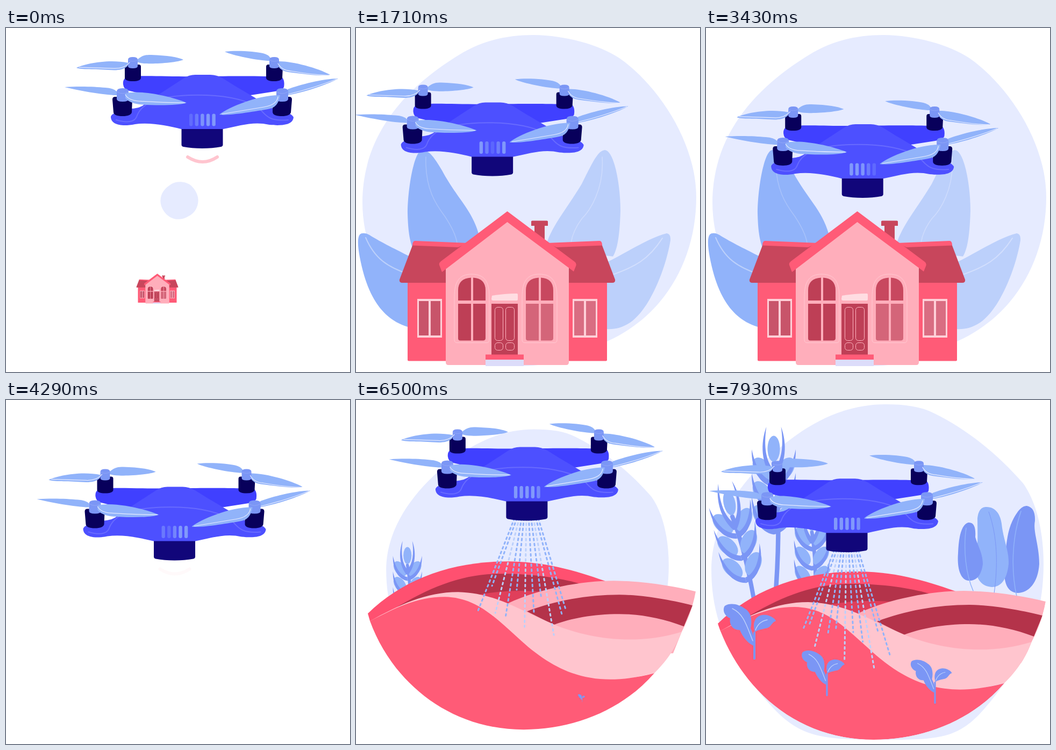
These frames come from a looping animation (640x640 px, 8000 ms). An HTML page:

```html
<!DOCTYPE html>
<html lang="en">
<head>
<meta charset="utf-8">
<title>Drone</title>
<style>
  html, body { margin: 0; width: 100%; height: 100%; overflow: hidden; background: #fff; }
  svg { display: block; width: 100%; height: 100%; }
  .sky { fill: #e6ebff; }
  .blue { fill: #91b3fa; }
  .pale { fill: #bcd0fb; }
  .mid { fill: #7b96f5; }
  .navy { fill: #08005b; }
  .red { fill: #ff5b77; }
  .pink { fill: #ffaebb; }
  .blush { fill: #ffc5ce; }
  .roof { fill: #c8465c; }
  .wine { fill: #be3f56; }
  .dark { fill: #b4334a; }
  .line { fill: none; stroke-linecap: round; stroke-linejoin: round; }
  .sky, .leaf, #house, #trees { transform-box: fill-box; transform-origin: center; }
  .leaf, #trees { transform-origin: bottom; }
</style>
</head>
<body>
<svg viewBox="0 0 640 640">
  <defs>
    <clipPath id="bowl"><path d="M0 0H640V375H632C626 408 616 430 606 450C592 486 575 507 555 527C495 596 405 632 312 632C170 632 66 540 22 417H0Z"/></clipPath>

    <g id="wheat">
      <path class="line" d="M0 0C10 60 10 150 2 250" stroke="#7b96f5" stroke-width="8"/>
      <ellipse class="blue" cy="-26" rx="11" ry="23"/>
      <g id="grains">
        <g id="grain">
          <ellipse class="blue" cx="-20" cy="10" rx="14" ry="23" transform="rotate(-35 -20 10)"/>
          <path class="mid" d="M0 42C-24 38 -40 12 -39 -25C-32 8 -20 27 0 32Z"/>
        </g>
        <use href="#grain" transform="scale(-1 1)"/>
      </g>
      <use href="#grains" y="42"/>
      <use href="#grains" y="84"/>
      <path class="mid" d="M-3 25C-22 0 -24 -35 -13 -65C-18 -30 -14 -4 0 12C14 -4 18 -30 13 -65C24 -35 22 0 3 25Z"/>
    </g>

    <g id="sprout">
      <path class="line" d="M0 -50V-2" stroke="#7b96f5" stroke-width="4"/>
      <path class="mid" d="M-2 -26C-14 -32 -22 -43 -27 -55C-42 -55 -47 -67 -45 -77C-56 -81 -60 -93 -55 -100C-45 -107 -28 -103 -18 -95C-5 -88 -4 -71 -7 -58C-1 -46 0 -37 -2 -26ZM1 -51C-4 -68 1 -81 15 -83C25 -85 38 -78 40 -72C31 -69 32 -59 20 -58C12 -56 5 -55 1 -51Z"/>
      <path class="line" d="M-41 -95C-20 -85 -15 -65 -3 -35M2 -55C6 -66 13 -72 24 -74" stroke="#bcd0fb" stroke-width="1.5"/>
    </g>
  </defs>

  <path id="sky1" class="sky" d="M330 13C390 14 450 30 490 56C560 105 633 210 633 315C633 430 575 535 467 583C410 620 350 629 300 629C140 629 12 470 12 325C12 200 90 110 200 45C240 22 285 13 330 13Z"/>

  <g class="leaf"><path class="blue" d="M124 227C108 226 96 300 96 345C97 380 100 400 110 420H235C228 345 195 330 160 265C148 245 138 228 124 227Z"/>
    <path class="line" d="M130 240C128 300 150 330 165 350Q185 380 188 400" stroke="#a9c3fb" stroke-width="1.5"/></g>
  <g class="leaf"><path class="blue" d="M12 382C-2 382 4 420 15 460C30 510 55 545 100 557V425C70 410 40 395 25 385Q18 381 12 382Z"/>
    <path class="line" d="M18 390C35 430 60 445 98 458" stroke="#bcd0fb" stroke-width="2"/></g>
  <g class="leaf"><path class="pale" d="M578 382Q586 383 585 395C578 440 550 520 510 548C495 558 480 561 466 560V436C500 420 545 390 578 382Z"/>
    <path class="line" d="M570 391C545 430 520 445 468 462" stroke="#d3dffd" stroke-width="2"/></g>
  <g class="leaf"><path class="pale" d="M463 227C480 228 492 290 492 340C491 375 488 410 478 425L352 410C362 370 390 340 420 290C440 250 450 228 463 227Z"/>
    <path class="line" d="M458 240C462 300 435 340 420 355Q403 378 400 400" stroke="#cfdcfd" stroke-width="1.5"/></g>

  <g id="house">
    <path class="red" d="M96 465H467V617.500Q467 619.500 465 619.500H98Q96 619.500 96 617.500Z"/>
    <path class="roof" d="M106 402L81 468Q80 474 86 474H200V404ZM457 402L482 468Q483 474 477 474H363V404ZM326 360Q326 358.500 328 358.500H355Q357 358.500 357 360V368H351V394H332V368H326Z"/>
    <path class="red" d="M110 396L208 400L190 408L105 404.500Q105 396 110 396ZM453 396L355 400L373 408L458 404.500Q458 396 453 396Z"/>
    <path class="pink" d="M167 438L281.500 352L396 438V622Q396 627 391 627H172Q167 627 167 622Z"/>
    <path class="red" d="M281.500 341L407 435Q411 438 409 443L405 453L281.500 361L160 454L155 441Q154 437 158 434Z"/>
    <g id="windows"></g>
    <path d="M253 498Q276 494 299 494Q301 494 301 496V505Q301 507 299 507H255Q252 507 252 504Z" fill="#ffdde2"/>
    <path class="wine" d="M252 513h49v96h-49z"/>
    <g class="line" stroke="#ffb3bf"><rect x="258.500" y="519.500" width="15" height="62" rx="5"/><rect x="278.500" y="519.500" width="16" height="62" rx="5"/><rect x="258.500" y="585.500" width="15" height="14" rx="5"/><rect x="278.500" y="585.500" width="16" height="14" rx="5"/></g>
    <path class="red" d="M241 607.500h71v10h-71z"/>
    <path d="M241 617h71v12h-71z" fill="#dcdcfa"/>
  </g>

  <path id="sky2" class="sky" d="M334 8C370 8 400 12 425 25C500 62 555 115 590 155C615 190 628 245 628 305C628 380 610 450 560 520C480 632 460 632 320 632C180 632 160 620 80 520C30 450 10 390 10 315C10 210 90 120 170 64C215 32 270 8 334 8Z"/>
  <g clip-path="url(#bowl)">
    <g transform="translate(126 118)"><g class="wheat"><use href="#wheat" transform="scale(1.05)"/></g></g>
    <g transform="translate(49 217)"><g class="wheat"><use href="#wheat" transform="rotate(-12)"/></g></g>
    <g transform="translate(197 246)"><g class="wheat"><use href="#wheat" transform="scale(.85)"/></g></g>
    <g id="trees">
      <path class="mid" d="M597 197Q613 200 612 225C608 245 620 270 620 305C618 340 600 359 580 359C560 358 553 340 555 305C558 275 560 245 570 225C580 205 588 197 597 197Z"/>
      <path class="blue" d="M520 199C540 198 548 215 550 230C553 260 564 280 563 305C560 335 548 348 532 348C510 347 500 330 501 300C507 270 505 245 505 220Q507 200 520 199Z"/>
      <path class="mid" d="M488 228C500 227 502 240 501 255C505 270 515 285 515 305C512 330 500 337 488 336C472 334 467 310 469 285C470 255 475 232 488 228Z"/>
      <path class="line" d="M484 238C478 280 484 325 497 355M586 207C568 260 568 320 578 365" stroke="#91b3fa" stroke-width="1.500"/>
      <path class="line" d="M526 208C543 255 543 310 536 360" stroke="#7b96f5"/>
    </g>
    <g id="field">
      <path d="M22 416C90 350 180 319 285 319C360 320 420 340 470 358L300 440L26 430Z" fill="#ff5070"/>
      <path class="dark" d="M70 408C140 365 200 342 270 342C330 342 380 350 415 360L320 410L200 385Z"/>
      <path d="M222 382C270 373 310 372 350 376L300 405Z" fill="#e03f5b"/>
      <path class="pink" d="M283 397C340 370 420 355 480 355C540 356 590 365 632 375C626 408 616 430 606 450L590 490H420L310 425Z"/>
      <path class="dark" d="M318 412C370 392 430 381 490 381C540 382 590 392 626 401L610 440C570 425 530 417 490 417C440 417 400 425 368 437Z"/>
      <path class="blush" d="M26 430C80 400 130 376 190 376C260 378 300 408 370 437C430 462 520 477 606 450C592 486 575 507 555 527L400 560L60 440Z"/>
      <path class="red" d="M26 430C70 408 110 385 165 385C225 386 260 425 300 460C380 535 450 554 555 527C495 596 405 632 312 632C170 632 66 540 26 430Z"/>
    </g>
  </g>
  <g transform="translate(426 565) scale(.79)"><use class="sprout" href="#sprout"/></g>
  <g transform="translate(90 483)"><use class="sprout" href="#sprout"/></g>
  <g transform="translate(225 551) scale(.82)"><use class="sprout" href="#sprout"/></g>

  <g id="drone">
    <g id="spray" class="line" stroke-width="3" stroke-dasharray="3.500 6"></g>
    <g id="signal" class="line" stroke="#ff5975" stroke-width="6">
      <path d="M338 240Q366 258 393 240"/>
      <path d="M326 254Q366 280 404 254"/>
      <path d="M317 271Q366 302 414 271"/>
    </g>
    <path d="M222 93C240 86 290 91 366 90C440 89 495 89 514 92Q519 98 517 110Q514 116 500 118L455 125L290 130C260 125 240 119 226 116Q219 113 218 105Q217 97 222 93Z" fill="#4040ff"/>
    <path d="M326.500 184H403.500V217Q403.500 220 400 221C380 225 350 225 330 221Q326.500 220 326.500 217Z" fill="#11067a"/>
    <path d="M330 94Q340 87 352 87H380Q392 87 404 94C435 114 465 130 500 152Q530 156 535 166C534 178 520 183 490 180C460 173 435 182 404 188H326C300 182 270 175 240 179C215 184 195 180 195 165Q197 156 234 150C255 148 258 141 270 133Z" fill="#4d50ff"/>
    <path class="line" d="M205 171C225 177 239 175 243 165C250 145 270 128 340 125C400 123 440 132 465 145C482 155 480 175 525 171" stroke="#686bff" stroke-width="2"/>
    <g id="vents"></g>
    <path class="navy" d="M221 72Q221 68 225 68H247Q251 68 251 72V93Q250 99 236 99Q222 99 221 93ZM484 72Q484 68 488 68H511Q515 68 515 72L514 93Q512 99 499 99Q485 99 484 93ZM198 133Q198 128 203 128H230Q235 128 235 133L234 157Q232 164 217 164Q201 164 200 157ZM496 133Q496 128 501 128H527Q532 128 532 133L530 157Q528 164 513 164Q497 164 496 157Z"/>
    <path class="blue" d="M131 74C145 67 190 57 228 65L226 71C217 79 205 79 190 78C165 76 140 78 131 74Z
      M244 59C255 50 260 50 270 50C300 51 320 54 330 59C320 64 280 67 262 66Q250 66 244 63Z
      M109 110C135 108 165 109 185 111Q200 112 206 118V125C180 125 130 115 109 110Z
      M493 61C475 62 420 51 407 44C430 41 465 44 478 47Q488 49 493 57Z
      M506 62C530 61 580 74 603 87C590 91 550 85 525 82Q511 80 506 70Z
      M524 114C545 106 590 94 618 94C605 102 560 119 524 125Z"/>
    <path class="mid" d="M227 59Q227 54 236 54Q245 54 245 59V71Q245 75 236 75Q227 75 227 71ZM490 59Q490 54 499 54Q508 54 508 59V71Q508 75 499 75Q490 75 490 71ZM206 118Q206 112 217 112Q228 112 228 118V132Q228 137 217 137Q206 137 206 132ZM503 118Q503 112 514 112Q525 112 525 118V132Q525 137 514 137Q503 137 503 132Z"/>
    <path class="blue" d="M222 122C245 114 305 126 336 139C320 145 270 144 248 142Q228 139 222 130Z
      M397 161C415 147 470 124 510 125C507 142 500 149 487 151C465 155 410 164 397 161Z"/>
    <path class="line" d="M136 73L200 75Q220 76 230 64M222 124Q228 135 248 136Q290 139 333 139M506 66Q513 79 530 80Q570 87 600 88M402 160L480 147Q504 143 506 128M526 123Q575 111 615 95" stroke="#e6ebff" stroke-width="1.200"/>
    <path class="line" d="M228 60Q236 64 244 60M491 60Q499 64 507 60M207 119Q217 125 227 119M504 119Q514 125 524 119" stroke="#91a7f8"/>
  </g>
</svg>
<script>
const LOOP = 8000;
const byId = id => document.getElementById(id);
const all = selector => [...document.querySelectorAll(selector)];
const clamp = v => Math.min(1, Math.max(0, v));
const ramp = (t, from, to) => clamp((t - from) / (to - from));
const easeOut = (u, power = 3) => 1 - (1 - u) ** power;
const backOut = (u, pull = 1.25) => 1 + (pull + 1) * (u - 1) ** 3 + pull * (u - 1) ** 2;

// Smooth monotone curve through a few [time, value] points, flat at both ends.
function track(...keys) {
  const slope = i => (keys[i + 1][1] - keys[i][1]) / (keys[i + 1][0] - keys[i][0]);
  const tangent = keys.map((_, i) => {
    if (!i || i === keys.length - 1) return 0;
    const a = slope(i - 1), b = slope(i);
    return a * b <= 0 ? 0 : 2 * a * b / (a + b);
  });
  return t => {
    const next = keys.findIndex(k => k[0] > t);
    if (next < 0) return keys[keys.length - 1][1];
    const i = next - 1, [t0, v0] = keys[i], [t1, v1] = keys[next];
    const d = t1 - t0, u = (t - t0) / d, w = 1 - u;
    return v0 * (1 + 2 * u) * w * w + tangent[i] * d * u * w * w
      + v1 * u * u * (3 - 2 * u) - tangent[next] * d * u * u * w;
  };
}

const droneX = track([0, 0], [960, -121], [2430, -95], [4290, -51.5], [5570, -1], [5850, 9], [7150, -103]);
const droneY = track([-900, -26], [0, 0], [2430, 71], [3400, 92], [4290, 74.500], [5570, 4], [6300, -1], [9000, 91]);

function archWindow(x, top, bottom) {
  return `<path class="line" stroke="#ffc9d2" d="M${x - 7} 500c0 -28 9 -42 32 -42c24 0 33 14 33 42v80q0 5.500 -5 5.500h-55q-5 0 -5 -5.500z"/>
    <path fill="${top}" d="M${x} 507v-19q0 -22 24 -23.500v42.500zM${x + 28} 507v-42.500q23 1.500 23 23.500v19z"/>
    <path fill="${bottom}" d="M${x} 513h24v68.500h-20q-4 0 -4 -4zM${x + 28} 513h23v64q0 4 -4 4.500h-19z"/>`;
}
const sideWindow = (x, glass) => `<path fill="#ffd0d8" d="M${x} 504h46v72h-46z"/>
  <path fill="${glass}" d="M${x + 3} 508h18v64h-18zM${x + 25} 508h18v64h-18z"/>`;
const repeat = (count, make) => Array.from({ length: count }, (_, i) => make(i)).join('');

byId('windows').innerHTML = archWindow(190, '#be3f56', '#be3f56') + archWindow(316, '#c8485f', '#d46579')
  + sideWindow(114, '#c8546a') + sideWindow(403, '#d96d82');
byId('vents').innerHTML = repeat(5, i =>
  `<rect x="${341 + i * 10.6}" y="159.500" width="6.400" height="23" rx="3" fill="#8199fb"/>`);
byId('spray').innerHTML = repeat(11, i => `<path stroke="${i % 3 === 2 ? '#bcd0fb' : '#91b3fa'}"/>`);

const leaves = all('.leaf'), wheats = all('.wheat'), sprouts = all('.sprout');
const signal = all('#signal path'), vents = all('#vents rect'), jets = all('#spray path');
const place = (el, value) => el.setAttribute('transform', value);
const scale = (el, size) => { el.style.transform = `scale(${size})`; };

function drawHome(t) {
  const leaving = 1 - ramp(t, 3450, 4220) ** 2;
  scale(byId('sky1'), easeOut(ramp(t, -54, 1120), 2.5) * leaving);
  scale(byId('house'), backOut(ramp(t, -45, 900)) * leaving);
  leaves.forEach((leaf, i) => scale(leaf, easeOut(ramp(t, 220 + 40 * i, 1000 + 40 * i)) * leaving));
}

function drawFarm(t) {
  scale(byId('sky2'), easeOut(ramp(t, 5830, 7090), 2.5));
  place(byId('field'), `translate(0 ${330 * (1 - backOut(ramp(t, 5819, 6900)))})`);
  scale(byId('trees'), easeOut(ramp(t, 6500, 7400)));
  wheats.forEach((wheat, i) => {
    const start = 6183 + 150 * i, left = 1 - easeOut(ramp(t, start, start + 1150));
    place(wheat, `translate(${-80 * left} ${500 * left}) scale(${1 - 0.9 * left})`);
  });
  sprouts.forEach((sprout, i) => {
    const start = 6460 + 100 * i, grown = easeOut(ramp(t, start, start + 660));
    place(sprout, `translate(${-8 * (1 - grown)} ${-5 * (1 - grown)}) scale(${grown})`);
  });
}

function drawDrone(t) {
  place(byId('drone'), `translate(${droneX(t)} ${droneY(t)})`);

  const pulse = (t / 2130 + 0.1) % 1;
  const strength = 0.35 * (1 - ramp(t, 4130, 4310));
  signal.forEach((arc, i) => {
    const age = pulse - 0.16 * i;
    arc.setAttribute('opacity', strength * ramp(age, 0, 0.05) * (1 - ramp(age, 0.31, 0.36)));
  });

  const dimmest = (t / 1400 + 0.03) % 1 * 8;
  vents.forEach((vent, i) => vent.setAttribute('opacity', 0.3 + 0.7 * clamp(Math.abs(i - dimmest) / 2)));

  const flow = easeOut(ramp(t, 6050, 6450));
  byId('spray').setAttribute('visibility', flow > 0 ? 'visible' : 'hidden');
  byId('spray').setAttribute('stroke-dashoffset', -t * 0.08);
  jets.forEach((jet, i) => {
    const side = i / 5 - 1;
    const reach = flow * (1 + 0.14 * Math.sin(t / 190 + i * 2.1));
    const length = 170 + 20 * side + 15 * Math.cos(i * 2.4);
    jet.setAttribute('d', `M${364 + 23 * side} 222l${(62 * side - 3) * reach} ${length * reach}`);
  });
}

const began = performance.now();
function frame() {
  const t = Math.max(0, performance.now() - began) % LOOP;
  drawHome(t);
  drawFarm(t);
  drawDrone(t);
  requestAnimationFrame(frame);
}
frame();
</script>
</body>
</html>
```
